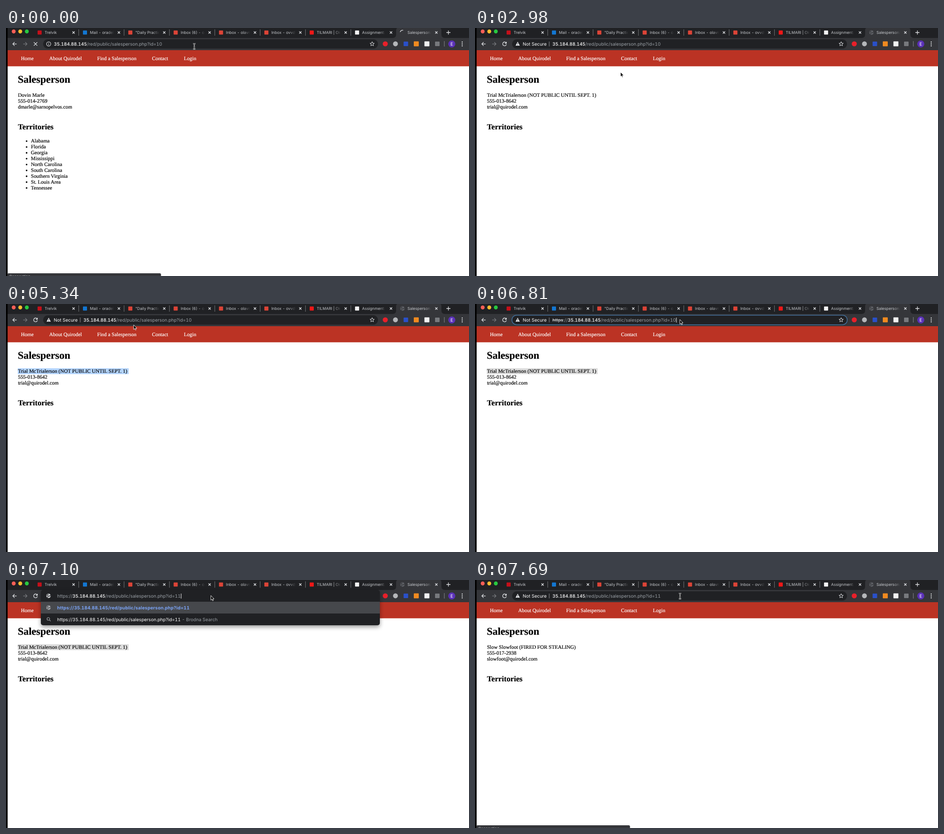
Write an HTML page that moves like this. It is 1023 px wide and 548 px high and loops after 7.99 s.

```html
<!DOCTYPE html>
<html lang="en">
<head>
<meta charset="utf-8">
<title>Salesperson page</title>
<style>
  html, body { margin: 0; width: 100%; height: 100%; overflow: hidden; background: #fff; }
  svg { display: block; }
  text { white-space: pre; text-rendering: geometricPrecision; }
  .page text { font: 11.47px 'Liberation Serif', serif; stroke: #000; stroke-width: .2; }
  .page .h1 { font-size: 22.94px; font-weight: 700; }
  .page .h2 { font-size: 17.2px; font-weight: 700; }
  .page .nav text { fill: #fff; stroke: #fff; }
  .ui text { font: 10px Inter, sans-serif; font-variant-numeric: tabular-nums; fill: #9aa0a6; }
  .ui .tab { font-size: 8.6px; fill: #c6c9cd; }
  .ui .white { fill: #fff; }
  .ui .host { fill: #fff; font-weight: 500; }
  .ui .match { fill: #7ba4f7; font-weight: 700; letter-spacing: .2px; }
  .line { fill: none; stroke: #e3e5e8; stroke-width: 1.3; }
  .dim { stroke: #77797d; }
  .popup { filter: drop-shadow(0 4px 5px #0006); }
</style>
</head>
<body>
<svg id="stage" width="1023" height="548" viewBox="0 0 1023 548">
  <defs>
    <linearGradient id="fade"><stop stop-color="#202124" stop-opacity="0"/><stop offset="1" stop-color="#202124"/></linearGradient>
    <linearGradient id="fadeActive"><stop stop-color="#35363a" stop-opacity="0"/><stop offset="1" stop-color="#35363a"/></linearGradient>
  </defs>
  <rect width="1023" height="548" fill="#fff"/>
  <g id="content" class="page"></g>
  <g id="frame" class="ui"></g>
  <g id="live" class="ui"></g>
</svg>
<script>
const LOOP = 7990;
const $ = id => document.getElementById(id);
const text = (x, y, body, cls = '') => `<text x="${x}" y="${y}" class="${cls}">${body}</text>`;
const rect = (x, y, w, h, fill, extra = '') =>
  `<rect x="${x}" y="${y}" width="${w}" height="${h}" fill="${fill}" ${extra}/>`;
const disc = (x, y, r, fill) => `<circle cx="${x}" cy="${y}" r="${r}" fill="${fill}"/>`;
const line = (d, cls = '', extra = '') => `<path d="${d}" class="line ${cls}" ${extra}/>`;
const square = (x, y, size, fill) => rect(x - size / 2, y - size / 2, size, size, fill, 'rx="1"');
const cross = (x, y, r) => line(`M${x - r} ${y - r}l${2 * r} ${2 * r}m0 ${-2 * r}l${-2 * r} ${2 * r}`);

const globe = (x, y, fill, ink) => disc(x, y, 4.8, fill) +
  `<path d="M${x - 4} ${y - 1}q3 0 3-3M${x - 2} ${y + 4}q0-4 3-3.5t3-2.5" fill="none" stroke="${ink}" stroke-width="1.4"/>`;

// ---- page ----
const people = [
  ['Dovin Marle', '555-014-2769', 'dmarle@sarnopelvos.com'],
  ['Trial McTrialerson (NOT PUBLIC UNTIL SEPT. 1)', '555-013-8642', 'trial@quirodel.com'],
  ['Slow Slowfoot (FIRED FOR STEALING)', '555-017-2938', 'slowfoot@quirodel.com'],
];
const territories = ['Alabama', 'Florida', 'Georgia', 'Mississippi', 'North Carolina',
  'South Carolina', 'Southern Virginia', 'St. Louis Area', 'Tennessee'];
const menu = [[33, 'Home'], [95.5, 'About Quirodel'], [201.5, 'Find a Salesperson'], [322.5, 'Contact'], [393, 'Login']];
const marks = {
  none: '',
  word: rect(190, 142, 35, 13, '#b4d5fe'),
  line: rect(26, 142, 245, 13, '#b4d5fe'),
  grey: rect(26, 142, 245, 13, '#dcdcdc'),
};

function drawPage(s) {
  const list = s.page ? '' : territories.map((name, i) =>
    disc(45.5, 250 + i * 12.94, 1.8, '#000') + text(55, 253 + i * 12.94, name)).join('');
  return rect(0, 49, 1023, 35.6, '#bb3324') +
    `<g class="nav">${menu.map(([x, label]) => text(x, 71, label)).join('')}</g>` +
    text(26, 121, 'Salesperson', 'h1') + marks[s.mark] +
    people[s.page].map((row, i) => text(26.4, 152.2 + i * 12.94, row)).join('') +
    text(26.4, 224, 'Territories', 'h2') + list;
}

// ---- browser frame ----
const tabs = [
  ['#c5101a', 'Trelvik'], ['#1377d2', 'Mail - oradelto'], ['#dc4437', '"Daily Practice'],
  ['#dc4437', 'Inbox (6) - olav'], ['#dc4437', 'Inbox - olavmar'], ['#dc4437', 'Inbox - ovvdta'],
  ['#f01818', 'TILMARI | Okan'], ['#f4f4f4', 'Assignment: W'], [null, 'Salesperson: D'],
];

function drawTab([color, title], i) {
  const x = 74.3 + i * 100.2, active = !color;
  return (active ? '' : square(x, 10, 9, color)) +
    `<svg x="${x + 11}" y="0" width="53" height="22">${text(0, 13, title, 'tab')}</svg>` +
    rect(x + 50, 2, 14.5, 18, `url(#${active ? 'fadeActive' : 'fade'})`) + cross(x + 75, 10, 2.5) +
    (i < 7 ? line(`M${x + 86.4} 3V17`, 'dim', 'style="stroke-width:1"') : '');
}

function drawFrame() {
  const star = Array.from({ length: 10 }, (_, i) => {
    const a = i * Math.PI / 5, r = i % 2 ? 2.2 : 5;
    return `${809 + r * Math.sin(a)},${35.3 - r * Math.cos(a)}`;
  }).join(' ');
  return rect(0, 0, 1023, 22, '#202124') + rect(0, 22, 1023, 27, '#35363a') +
    '<path d="M854 22q8 0 8-8V5q0-6 6-6h88q6 0 6 6v9q0 8 8 8z" fill="#35363a"/>' +
    rect(0, 0, 3.6, 548, '#000') +
    disc(17, 7.6, 4.3, '#ff5f57') + disc(31.5, 7.6, 4.3, '#febc2e') + disc(46, 7.6, 4.3, '#28c840') +
    tabs.map(drawTab).join('') + line('M973 10H982M977.5 5.5V14.5') +
    line('M23.5 35.3H15M19 31.2L15 35.3L19 39.4') +
    line('M38 35.3H46.5M42.5 31.2L46.5 35.3L42.5 39.4', 'dim') +
    rect(82, 25, 740, 20.5, '#202124', 'rx="10.2"') +
    `<polygon points="${star}" class="line" style="stroke-width:1"/>` +
    disc(838, 35, 5.6, '#e8202a') + disc(860.5, 35, 5.4, '#b5b7ba') + square(883.5, 35, 10, '#2a50c8') +
    square(906.5, 35, 11, '#f08a20') + square(930, 35, 11, '#f2f2f2') + square(953, 35, 10, '#77797d') +
    line('M968.5 29V41', 'dim') + disc(985, 35.3, 7.8, '#5a30b8') +
    text(982, 38.7, 'E', 'white') +
    [31, 35.2, 39.4].map(y => disc(1008, y, 1.2, '#e3e5e8')).join('');
}

// ---- address bar ----
const PATH = '/red/public/salesperson.php?id=';
const HOST = '35.184.88.145';
const span = (body, cls) => `<tspan class="${cls}">${body}</tspan>`;
const address = (x, body) => `<text id="url" x="${x}" y="38.7">${body}</text>`;
const caret = '<line id="caret" y1="30" y2="41" stroke="#fff" stroke-width="1"/>';

function drawAddress({ mode, id }) {
  const plain = span(HOST, 'host') + PATH + id;
  if (mode === 'loading')
    return line('M99 35.2a4.7 4.7 0 1 1-9.4 0a4.7 4.7 0 1 1 9.4 0M94.3 34.5V38M94.3 32V33.2', '', 'style="stroke-width:1.1"') +
      address(105.8, plain);
  if (mode === 'suggest') {
    const full = 'https://' + HOST + PATH + id;
    return `<g class="popup">${rect(77, 22, 749, 78, '#202124', 'rx="5"')}</g>` +
      rect(77, 48, 749, 26, '#46484c') + globe(94, 35, '#d5d7da', '#202124') + globe(94, 61, '#a9acb0', '#46484c') +
      line('M96.6 86a3 3 0 1 1-6 0a3 3 0 1 1 6 0M95.8 88.2l2.8 2.8', '', 'style="stroke:#a9acb0;stroke-width:1.1"') +
      address(113, 'https://' + plain) + caret + text(113, 64.7, full, 'match') +
      text(113, 90.5, span(full, 'white') + ' - Brodna Search');
  }
  const ring = mode === 'plain' ? '' :
    rect(81.5, 24.7, 741, 21, 'none', 'rx="10.5" stroke="#42709c" stroke-width="1.5"');
  const warning = '<path d="M94.3 30.3L99 39H89.6Z" fill="#e8eaed"/>' +
    line('M94.3 33V36M94.3 37V38', '', 'style="stroke:#202124;stroke-width:1"') +
    text(105.5, 38.7, 'Not Secure', 'white') + line('M164 30V40.5', 'dim');
  const body = {
    plain: address(171, plain),
    selected: rect(171, 29, 0, 13, '#a8c7fa', 'id="selection"') +
      address(171, `<tspan fill="#202124">${HOST + PATH + id}</tspan>`),
    edit: address(171, '<tspan fill="#d5d7da" text-decoration="line-through">https</tspan>://' + plain) + caret,
  }[mode];
  return ring + warning + body;
}

const BEAM = 'M-2.6-6Q0-6 0-4.5Q0-6 2.6-6M0-4.5V4.5M-2.6 6Q0 6 0 4.5Q0 6 2.6 6M-1.5 2H1.5';
function drawCursor([kind, x, y]) {
  const shape = kind === 'beam'
    ? line(BEAM, '', 'style="stroke:#fff;stroke-width:2.2"') + line(BEAM, '', 'style="stroke:#111;stroke-width:.9"')
    : '<path d="M0 0V10.2L2.3 8.1L3.9 11.7L5.5 11L3.9 7.5H7.1Z" fill="#000" stroke="#fff" stroke-width=".9"/>';
  return `<g transform="translate(${x} ${y})">${shape}</g>`;
}

function drawLive(s, index) {
  const loading = s.mode === 'loading';
  const tabIcon = loading
    ? line('M871 9A5 5 0 0 1 877.5 5.2', '', `transform="rotate(${index * 75} 876 10)"`)
    : globe(876, 10, '#606267', '#35363a');
  const reload = loading ? cross(65.3, 35.3, 3.8)
    : line('M68.3 32.2A4.2 4.2 0 1 0 69.4 36.2') + '<path d="M70 30V34.6H65.4Z" fill="#e3e5e8"/>';
  const status = `<g opacity="${s.status}">` +
    rect(3, 542, 339.5, 12, '#35363a', 'rx="3"') + text(7, 552, 'Connecting...', 'tab') + '</g>';
  return tabIcon + reload + drawAddress(s) + status + drawCursor(s.cursor);
}

// ---- timeline: each step changes only the listed values ----
const at = (x, y) => ({ cursor: ['arrow', x, y] });
const beam = (x, y) => ({ cursor: ['beam', x, y] });
const steps = [
  [0, { page: 0, mode: 'loading', id: 10, status: 1, mark: 'none', ...beam(416, 40.5) }],
  [150, {}], [300, {}],
  [440, { page: 1, mode: 'plain' }],
  [590, { status: .7 }], [730, { status: .35 }], [880, { status: 0 }],
  [2080, beam(417, 41)], [2230, at(420, 36)],
  [2980, at(321.5, 97.5)], [3120, at(246, 140)], [3270, at(202, 159)], [3410, beam(195, 149)],
  [3710, { mark: 'word' }], [3860, { mark: 'line' }],
  [4460, beam(182, 148)], [4600, at(238, 104)], [4750, at(324, 59)],
  [5050, at(314, 57)], [5190, at(296, 51)], [5340, at(282, 46)], [5490, beam(290, 37)],
  [5630, { mode: 'selected', mark: 'grey' }],
  [5780, beam(352, 36)], [5920, beam(428, 35.5)], [6070, beam(453, 35.5)],
  [6520, { mode: 'edit' }],
  [6810, at(452.7, 34.3)],
  [6960, { mode: 'suggest', id: 1 }], [7100, { id: 11 }],
  [7250, { mode: 'loading', ...beam(453, 35.5) }], [7400, { status: 1 }], [7540, {}],
  [7690, { page: 2, mode: 'plain', mark: 'none' }],
];
let merged = {};
const states = steps.map(([, change]) => merged = { ...merged, ...change });

let shown = -1;
function render(now) {
  const time = now % LOOP;
  const index = steps.findLastIndex(([start]) => start <= time);
  if (index !== shown) {
    shown = index;
    $('content').innerHTML = drawPage(states[index]);
    $('live').innerHTML = drawLive(states[index], index);
    const url = $('url'), length = url.getComputedTextLength();
    $('selection')?.setAttribute('width', length);
    const end = Number(url.getAttribute('x')) + length + 1;
    $('caret')?.setAttribute('x1', end);
    $('caret')?.setAttribute('x2', end);
  }
  requestAnimationFrame(() => render(performance.now() - origin));
}

$('frame').innerHTML = drawFrame();
const origin = performance.now();
render(0);
</script>
</body>
</html>
```
